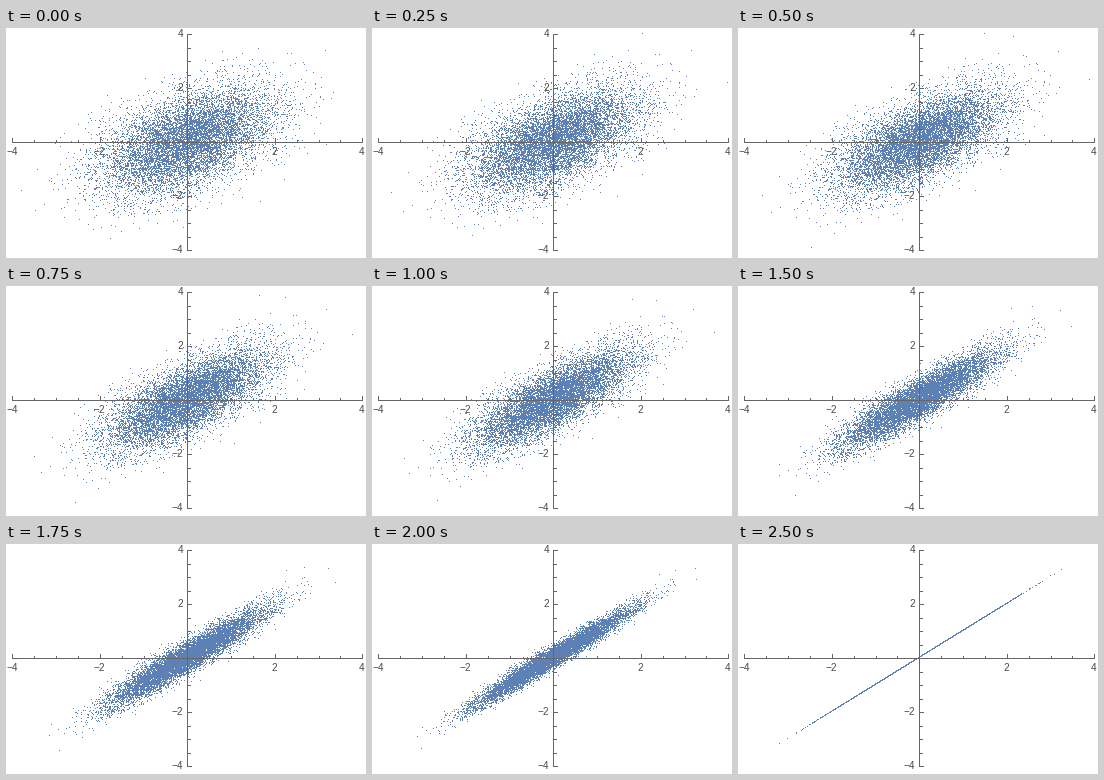
A matplotlib script that plays this animation: 360 px wide and 230 px high, repeating every 2.75 s.

```python
import numpy as np
import matplotlib.pyplot as plt
from matplotlib.animation import FuncAnimation

W, H, DPI = 360, 230, 80
FRAMES, STEP = 11, 250
X0, Y0 = 181.25, 114.25      # pixel position of the origin
SX, SY = 43.75, 27.0         # pixels per unit
BLUE, GRAY, INK = "#5e81b5", "#666666", "#4a4a4a"
PX = 72 / DPI                # one pixel in points

# Bivariate normal sample with correlation 0.5, split into the part
# along the diagonal and the part across it.
rng = np.random.default_rng(7)
along = rng.normal(0, np.sqrt(0.75), 10000)
across = rng.normal(0, 0.5, 10000)
keep = (np.abs(along) < 2.95) & (np.abs(along) + np.abs(across) < 3.5)

# Outliers at the rim of the cloud.
rim = np.array([
    (3.08, 1.00), (3.26, -0.10), (3.01, -1.08), (2.74, -1.56),
    (-3.19, 0.92), (-2.80, -0.99), (-3.02, -0.46), (-2.68, 0.92),
])
along = np.concatenate([along[keep], rim[:, 0]])
across = np.concatenate([across[keep], rim[:, 1]])

fig = plt.figure(figsize=(W / DPI, H / DPI), dpi=DPI, facecolor="white")
ax = fig.add_axes([0, 0, 1, 1])
ax.set_xlim(0, W)
ax.set_ylim(H, 0)
ax.axis("off")

dots, = ax.plot([], [], ",", color=BLUE, zorder=1)


def stroke(xs, ys):
    ax.plot(xs, ys, color=GRAY, lw=PX, antialiased=False,
            solid_capstyle="butt", zorder=2)


def label(x, y, value, ha):
    ax.text(x, y, str(value).replace("-", "\u2212"), ha=ha, va="baseline",
            family="Liberation Sans", fontsize=10 * PX, color=INK, zorder=3)


def draw_axes():
    stroke([X0 - 4 * SX, X0 + 4 * SX], [Y0, Y0])
    stroke([X0, X0], [Y0 - 4 * SY, Y0 + 4 * SY])
    for k in range(-8, 9):
        if k == 0:
            continue
        v = k / 2
        major = k % 4 == 0
        size = 4 if major else 2.5
        x, y = X0 + v * SX, Y0 - v * SY
        stroke([x, x], [Y0, Y0 - size])
        stroke([X0, X0 + size], [y, y])
        if major:
            label(x - 0.25, 127, int(v), "center")
            label(177.5, y + 2.75, int(v), "right")


def update(i):
    spread = across * (1 - i / (FRAMES - 1))
    x, y = along + spread, along - spread
    inside = (np.abs(x) <= 4) & (np.abs(y) <= 4)
    # Whole pixels keep every dot crisp.
    dots.set_data(np.floor(X0 + SX * x[inside]), np.floor(Y0 - SY * y[inside]))
    return dots,


draw_axes()
anim = FuncAnimation(fig, update, frames=FRAMES, interval=STEP,
                     repeat=True, repeat_delay=0, blit=False)
plt.show()
```
